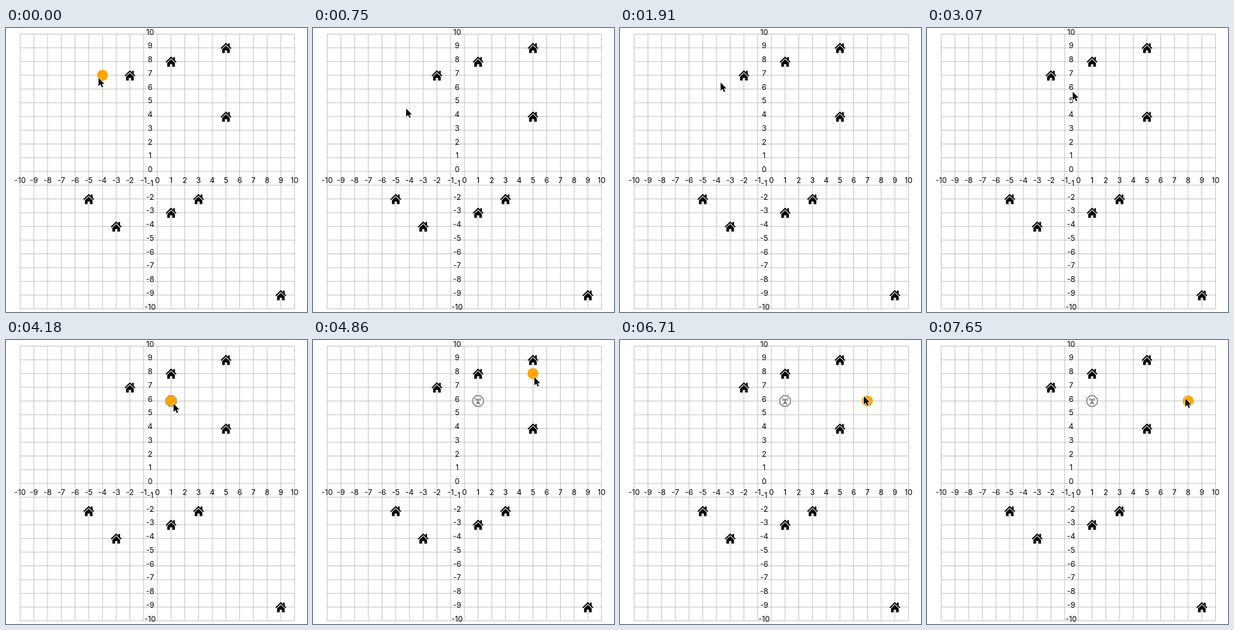
Write an HTML page that moves like this. It is 521 px wide and 491 px high and loops after 8000 ms.

```html
<!DOCTYPE html>
<html>
<head>
<meta charset="utf-8">
<style>
  html, body { margin: 0; width: 100%; height: 100%; overflow: hidden; background: #fff; }
  svg { display: block; }
  text { font: 13px Inter, "Liberation Sans", sans-serif; text-anchor: middle; }
</style>
</head>
<body>
<svg width="521" height="491" viewBox="0 0 521 491">
  <defs>
    <g id="house">
      <path d="M-8.6 1.2L0 -7.2L8.6 1.2" fill="none" stroke="#000" stroke-width="2.3"/>
      <path d="M3.8 -7.8h2.8v6.6l-2.8 -2.6z"/>
      <path d="M-6.6 2.4L0 -4L6.6 2.4V9H2V4.4H-2V9H-6.6z"/>
    </g>
  </defs>
  <path id="grid" stroke="#bbb"/>
  <g id="labels"></g>
  <g id="houses"></g>
  <g id="tower" fill="none" stroke="#444" stroke-width=".9">
    <path d="M-3.8 -9H3.8L9 -3.8V3.8L3.8 9H-3.8L-9 3.8V-3.8z" fill="#fff" stroke="#666" stroke-width="1.4"/>
    <path d="M-3 6.2L0 -1.5L3 6.2M-1.8 3H1.8M-2.5 5.2L1.3 2.2M2.5 5.2L-1.3 2.2"/>
    <path d="M-2 -4.5q-1.2 2 0 4M2 -4.5q1.2 2 0 4M-4 -5q-1.6 2.5 0 5M4 -5q1.6 2.5 0 5"/>
    <circle cy="-2.5" r=".8" fill="#444"/>
  </g>
  <circle id="spot" r="9.5" fill="orange"/>
  <path id="cursor" d="M1.2 1.2V15.4L4.5 12.3L6.8 17.5L9 16.5L6.8 11.5H11.2z"
    stroke="#fff" stroke-width="1.6" paint-order="stroke"/>
</svg>
<script>
const LOOP = 8000, STEP = 23.75, REACH = 10;
const $ = id => document.getElementById(id);
const px = x => 262 + x * STEP;
const py = y => 248 - y * STEP;
const moveTo = (el, x, y) => el.setAttribute('transform', `translate(${x} ${y})`);
const show = (el, on) => el.style.display = on ? '' : 'none';

// Grid and axis labels
let lines = '', labels = '';
for (let i = -10; i <= 10; i++) {
  lines += `M${px(i)} 10.5V485.5M24.5 ${py(i)}H499.5`;
  labels += `<text x="${px(i)}" y="267.5">${i}</text><text x="249.5" y="${py(i) + 1.2}">${i}</text>`;
}
$('grid').setAttribute('d', lines);
$('labels').innerHTML = labels;

const homes = [[-2, 7], [1, 8], [5, 9], [5, 4], [-5, -2], [-3, -4], [1, -3], [3, -2], [9, -9]];
$('houses').innerHTML = homes.map(([x, y]) => `<use href="#house" x="${px(x)}" y="${py(y)}"/>`).join('');
moveTo($('tower'), px(1), py(6));

// Pointer moves: start, end, target x, y and how far the path sags
const moves = [
  [320, 750, 160, 138], [750, 1100, 97, 115], [1130, 1910, 173, 93], [1930, 2140, 166, 84],
  [2390, 3220, 259, 107, 15], [3550, 3710, 288, 108], [4140, 4860, 382, 63, 42],
  [5110, 5330, 379, 74], [5470, 5960, 415.5, 77, 4], [6150, 6710, 421, 96], [7030, 7650, 446, 100]
];

function pointerAt(t) {
  let x = 159, y = 85;
  for (const [start, end, toX, toY, sag = 0] of moves) {
    if (t < start) break;
    const u = Math.min(1, (t - start) / (end - start)), k = u * u * (3 - 2 * u);
    x += (toX - x) * k;
    y += (toY - y) * k + sag * Math.sin(Math.PI * k);
  }
  return [x, y];
}

function draw(t) {
  const [x, y] = pointerAt(t);
  moveTo($('cursor'), x, y);

  // The grid point under the pointer lights up
  const hx = x + 3, hy = y + 3;
  const sx = px(Math.round((hx - 262) / STEP)), sy = py(Math.round((248 - hy) / STEP));
  moveTo($('spot'), sx, sy);
  show($('spot'), Math.hypot(hx - sx, hy - sy) < REACH);
  show($('tower'), t >= 3980);
}

const start = performance.now();
function tick() {
  draw((performance.now() - start) % LOOP);
  requestAnimationFrame(tick);
}
tick();
</script>
</body>
</html>
```
